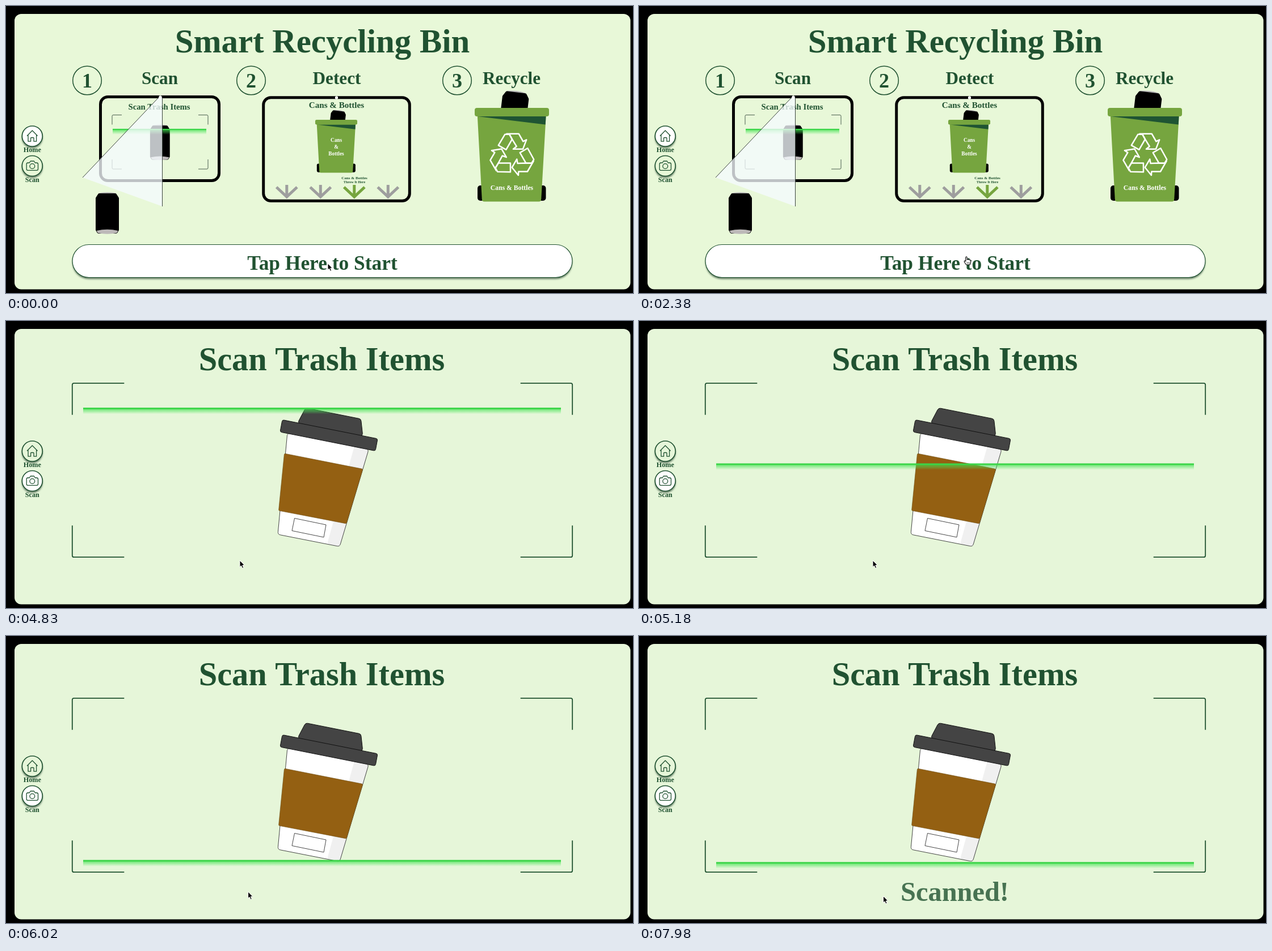
Write an HTML page with a canvas that moves like this. It is 1105 px wide and 507 px high and loops after 8000 ms.

```html
<!DOCTYPE html>
<html lang="en">
<head>
<meta charset="utf-8">
<title>Smart Recycling Bin</title>
<style>
html, body { margin: 0; width: 100%; height: 100%; overflow: hidden; background: #000; }
canvas { display: block; width: 1105px; height: 507px; }
</style>
</head>
<body>
<canvas id="stage" width="1105" height="507"></canvas>
<script>
const W = 1105, H = 507, LOOP = 8000;
const INK = '#205231', LEAF = '#76a53f', SHADE = '#1f5433', GLOW = '#3bd548';
const stage = document.getElementById('stage').getContext('2d');
let c = stage;

// Timing helpers
const clamp = v => Math.min(1, Math.max(0, v));
const span = (t, from, to) => clamp((t - from) / (to - from));
const smooth = u => u * u * (3 - 2 * u);
const mix = (a, b, u) => a + (b - a) * u;

// Cubic bezier (0, 0, .58, 1)
function easeOut(x) {
  let lo = 0, hi = 1;
  for (let i = 0; i < 24; i++) {
    const s = (lo + hi) / 2;
    if (1.74 * (1 - s) * s * s + s ** 3 < x) lo = s; else hi = s;
  }
  return smooth(lo);
}

// Drawing helpers
function paint(fill, stroke, width = 1) {
  if (fill) { c.fillStyle = fill; c.fill(); }
  if (stroke) { c.strokeStyle = stroke; c.lineWidth = width; c.stroke(); }
}

function poly(pts, fill, stroke, width) {
  c.beginPath();
  pts.forEach(([x, y], i) => i ? c.lineTo(x, y) : c.moveTo(x, y));
  c.closePath();
  paint(fill, stroke, width);
}

function softPoly(pts, r, fill, stroke, width) {
  const n = pts.length, [ax, ay] = pts[0], [bx, by] = pts[n - 1];
  c.beginPath();
  c.moveTo((ax + bx) / 2, (ay + by) / 2);
  pts.forEach((p, i) => c.arcTo(...p, ...pts[(i + 1) % n], r));
  c.closePath();
  paint(fill, stroke, width);
}

function box(x, y, w, h, r, fill, stroke, width) {
  c.beginPath();
  c.roundRect(x, y, w, h, r);
  paint(fill, stroke, width);
}

function disc(x, y, r, fill, stroke, width) {
  c.beginPath();
  c.arc(x, y, r, 0, 7);
  paint(fill, stroke, width);
}

function path(d, stroke, width) {
  c.strokeStyle = stroke;
  c.lineWidth = width;
  c.stroke(new Path2D(d));
}

function label(str, x, y, size, fill = INK) {
  c.font = `bold ${size}px "Liberation Serif", "Times New Roman", serif`;
  c.textAlign = 'center';
  c.fillStyle = fill;
  c.fillText(str, x, y);
}

function at(x, y, scale, turn, draw) {
  c.save();
  c.translate(x, y);
  c.scale(scale, scale);
  c.rotate(turn);
  draw();
  c.restore();
}

function shadowed(draw) {
  c.save();
  c.shadowColor = 'rgba(20,50,30,.6)';
  c.shadowBlur = 3;
  c.shadowOffsetY = 3;
  draw();
  c.restore();
}

function pill(x, y, w, text) {
  shadowed(() => box(x, y, w, 58, 29, '#fff'));
  box(x, y, w, 58, 29, null, INK, 1.2);
  label(text, x + w / 2, y + 44, 35.4);
}

function backdrop(tint) {
  c.fillStyle = '#000';
  c.fillRect(0, 0, W, H);
  box(15, 14, 1085.5, 486.5, 12, tint);
}

function sideBar(tint, active) {
  [230, 282.5].forEach((y, i) => {
    shadowed(() => disc(46.3, y, 18.3, active === i ? '#fff' : tint));
    disc(46.3, y, 18, null, INK, 1.7);
  });
  c.lineJoin = 'round';
  path('M37 229.5 L46.3 220 L55.6 229.5 M39 227.8 V239.2 H43.6 V233.5 Q43.6 232.5 44.6 232.5 H48 Q49 232.5 49 233.5 V239.2 H53.6 V227.8', INK, 1.3);
  path('M38.5 277 H41.3 L43.2 274 H49.4 L51.3 277 H54 Q56.5 277 56.5 279.3 V288 Q56.5 290.3 54 290.3 H38.5 Q36.2 290.3 36.2 288 V279.3 Q36.2 277 38.5 277 Z', INK, 1.3);
  disc(46.3, 283, 4.4, null, INK, 1.3);
  c.lineJoin = 'miter';
  label('Home', 46.3, 258, 12.2);
  label('Scan', 46.3, 310.6, 12.2);
}

// Soda can, 41 by 74 units, centred on its middle
function can() {
  c.beginPath();
  c.ellipse(0, -34.5, 15.5, 2.5, 0, 0, 7);
  paint('#b5b5b5');
  softPoly([[-15.5, -35], [15.5, -35], [20.5, -27], [20.5, 30], [17, 36], [-17, 36], [-20.5, 30], [-20.5, -27]], 3, '#000');
  c.beginPath();
  c.moveTo(-19, 31);
  c.quadraticCurveTo(0, 26.5, 19, 31);
  c.lineTo(16.5, 35);
  c.quadraticCurveTo(0, 38.5, -16.5, 35);
  c.closePath();
  paint('#bdb9b9');
}

// Bin with its lid's top centre at the origin
function bin() {
  c.save();
  c.beginPath();
  c.rect(-60, -40, 120, 41);
  c.clip();
  at(3, 12, 1.14, .12, can);
  c.restore();
  box(-60.5, 137, 15, 27, 5, '#000');
  box(45, 137, 15, 27, 5, '#000');
  softPoly([[-61, 8], [60.5, 8], [51.5, 165.5], [-52.5, 165.5]], 4, LEAF);
  poly([[-60, 15], [60, 15], [59.2, 29.5]], SHADE);
  box(-65.5, 0, 131, 15, 4, LEAF);
}

function recycleSign() {
  c.lineJoin = 'round';
  for (let i = 0; i < 3; i++) {
    at(892, 263.5, .97, i * Math.PI * 2 / 3, () => {
      poly([[-13, -38], [-25, -18], [-11, -10], [0, -29], [-5, -38]], null, '#fff', 2.6);
      poly([[-10, -39], [12, -39], [20, -25], [26, -28], [19.5, -11], [2, -11], [8, -16], [0, -29], [-5, -38]], null, '#fff', 2.6);
    });
  }
  c.lineJoin = 'miter';
}

function beam(x, y, w, core, fade) {
  const g = c.createLinearGradient(0, y, 0, y + fade);
  g.addColorStop(0, 'rgba(50,220,65,.75)');
  g.addColorStop(.5, 'rgba(70,228,85,.42)');
  g.addColorStop(1, 'rgba(80,235,95,0)');
  c.fillStyle = g;
  c.fillRect(x, y, w, fade);
  c.fillStyle = GLOW;
  c.fillRect(x, y - core / 2, w, core);
}

function brackets(l, t, r, b, dx, dy, round, color, width) {
  for (const [x, y, sx, sy] of [[l, t, 1, 1], [r, t, -1, 1], [l, b, 1, -1], [r, b, -1, -1]]) {
    c.beginPath();
    c.moveTo(x, y + sy * dy);
    c.arcTo(x, y, x + sx * dx, y, round);
    c.lineTo(x + sx * dx, y);
    paint(null, color, width);
  }
}

function homePage(tint) {
  backdrop(tint);
  sideBar(tint, 0);
  label('Smart Recycling Bin', 557.5, 82, 58.8);
  [['Scan', 143, 271], ['Detect', 432, 583], ['Recycle', 795, 891]].forEach(([name, x, tx], i) => {
    disc(x, 131.5, 25.3, null, INK, 1.5);
    label(i + 1, x, 144, 36);
    label(name, tx, 138, 31.2);
  });

  // Scan panel
  label('Scan Trash Items', 270, 183, 14.7);
  box(166.5, 160.5, 209, 148, 13, null, '#000', 5);
  brackets(187, 192.5, 356, 288, 17, 17, 2, '#4d5f50', 1);
  at(271.3, 241, .85, 0, can);
  beam(188, 218, 165, 2.2, 9);
  poly([[269.5, 161], [275.5, 162], [275.5, 354], [135, 303]], 'rgba(246,252,255,.77)');
  c.beginPath();
  c.moveTo(135, 303);
  c.lineTo(269.5, 161);
  c.moveTo(275.5, 162);
  c.lineTo(275.5, 354);
  paint(null, '#3c463f', 1);
  disc(272, 161, 2.7, '#fff');
  at(178.5, 366, 1, 0, can);

  // Detect panel
  box(453.7, 161.7, 257.6, 182.6, 13, null, '#000', 5);
  disc(582.5, 162, 2.7, '#fff');
  label('Cans & Bottles', 582.5, 180, 15.1);
  at(582, 201, .565, 0, bin);
  ['Cans', '&', 'Bottles'].forEach((s, i) => label(s, 582, 240 + i * 12, 9.3, '#fff'));
  label('Cans & Bottles', 614, 306, 7.1);
  label('Throw It Here', 614, 313, 6.2);
  for (let i = 0; i < 4; i++) {
    const x = 494.8 + i * 59.5;
    path(`M${x} 316 V336 M${x - 18.2} 320 L${x} 337 L${x + 18.2} 320`, i === 2 ? LEAF : '#9e9e9e', 5);
  }

  // Recycle panel
  at(891.5, 180, 1, 0, bin);
  recycleSign();
  label('Cans & Bottles', 891.5, 325, 11.7, '#fff');

  pill(117, 421.5, 881, 'Tap Here to Start');
}

function questionPage(tint) {
  backdrop(tint);
  sideBar(tint, 1);
  label('Scan Trash Items', 556.5, 87, 58.4);
  label('Does your trash item has a barcode?', 557, 264, 48.4);
  pill(115, 399, 405, 'Yes');
  pill(596, 399, 405, 'No');
}

function cup() {
  const body = [[496, 197], [639.5, 226], [588, 398.5], [479, 377]];
  softPoly(body, 5, '#fff');
  softPoly([[614, 221], [639.5, 226], [588, 398.5], [566, 394]], 4, '#f0f0f0');
  softPoly(body, 5, null, '#333', .9);
  softPoly([[490.5, 234], [629, 261.5], [600, 358], [480.5, 335]], 2, '#946012', '#6b4a12', .6);
  softPoly([[513, 182], [528, 153.5], [625.5, 173], [629, 205]], 5, '#444', '#111', 1);
  softPoly([[487, 174.5], [655, 208], [651, 229.5], [483, 196]], 3, '#444', '#111', 1);
  poly([[508.5, 348.5], [564, 360], [560, 382], [504, 370.5]], '#fff', '#333', .9);
}

function scanPage(tint) {
  backdrop(tint);
  sideBar(tint, 1);
  label('Scan Trash Items', 556.5, 87, 58.4);
  brackets(116.8, 109.8, 998.2, 417.2, 91.5, 56, 3, INK, 1.8);
  cup();
}

function cached(page, tint) {
  const sheet = document.createElement('canvas');
  sheet.width = W;
  sheet.height = H;
  c = sheet.getContext('2d');
  page(tint);
  c = stage;
  return sheet;
}

function arrowCursor() {
  c.lineJoin = 'round';
  poly([[0, 0], [0, 11.6], [2.6, 9.3], [4.5, 13.6], [6.6, 12.7], [4.8, 8.5], [8.2, 8.3]], '#000', '#fff', 1);
  c.lineJoin = 'miter';
}

function handCursor() {
  const hand = new Path2D('M-1.3 8 V1 Q0 -1.6 1.2 1 V5 Q2.6 3.4 3.6 5.2 Q5 4 5.8 5.8 Q7.4 5 7.6 7 V10 L6.2 14 H-.4 L-3.6 9.2 Q-4.2 7 -2.6 7 Z');
  c.fillStyle = '#fff';
  c.fill(hand);
  c.strokeStyle = '#000';
  c.lineWidth = 1.1;
  c.stroke(hand);
  path('M1.2 9.5 V12 M3.2 9.5 V12 M5.2 9.5 V12', '#000', .7);
}

// Each move: start, end, from, to
const moves = [
  [950, 1260, [567, 454.7], [577, 443]],
  [3110, 3570, [577, 443], [412, 423]],
  [5640, 6180, [412, 423], [430.5, 459.5]]
];

function cursor(t) {
  const [from, to, a, b] = moves.filter((m, i) => !i || t >= m[0]).pop();
  const u = smooth(span(t, from, to));
  const x = mix(a[0], b[0], u), y = mix(a[1], b[1], u);
  const hand = (t >= 1470 && t < 3150) || (t >= 3150 && t < 3850 && x < 520);
  at(x, y, 1, 0, hand ? handCursor : arrowCursor);
}

const WARM = '#e8f8d8', COOL = '#e6f6d9';
const home = cached(homePage, WARM);
const ask = cached(questionPage, WARM);
const askCool = cached(questionPage, COOL);
const scan = cached(scanPage, COOL);

function sheet(img, alpha = 1) {
  c.globalAlpha = alpha;
  c.drawImage(img, 0, 0);
  c.globalAlpha = 1;
}

function render(t) {
  if (t < 2880) sheet(home);
  if (t >= 2570 && t < 3850) sheet(ask, easeOut(span(t, 2570, 2880)));
  if (t >= 3850) sheet(askCool);
  if (t >= 3930) {
    const shown = easeOut(span(t, 3930, 4070));
    sheet(scan, shown);
    c.globalAlpha = shown;
    beam(136, mix(127, 400.7, easeOut(span(t, 4745, 6145))), 842, 2.8, 10);
    c.globalAlpha = easeOut(span(t, 7050, 8550));
    label('Scanned!', 556.5, 468, 48.4);
    c.globalAlpha = 1;
  }
  cursor(t);
}

function tick() {
  render(performance.now() % LOOP);
  requestAnimationFrame(tick);
}
tick();
</script>
</body>
</html>
```
